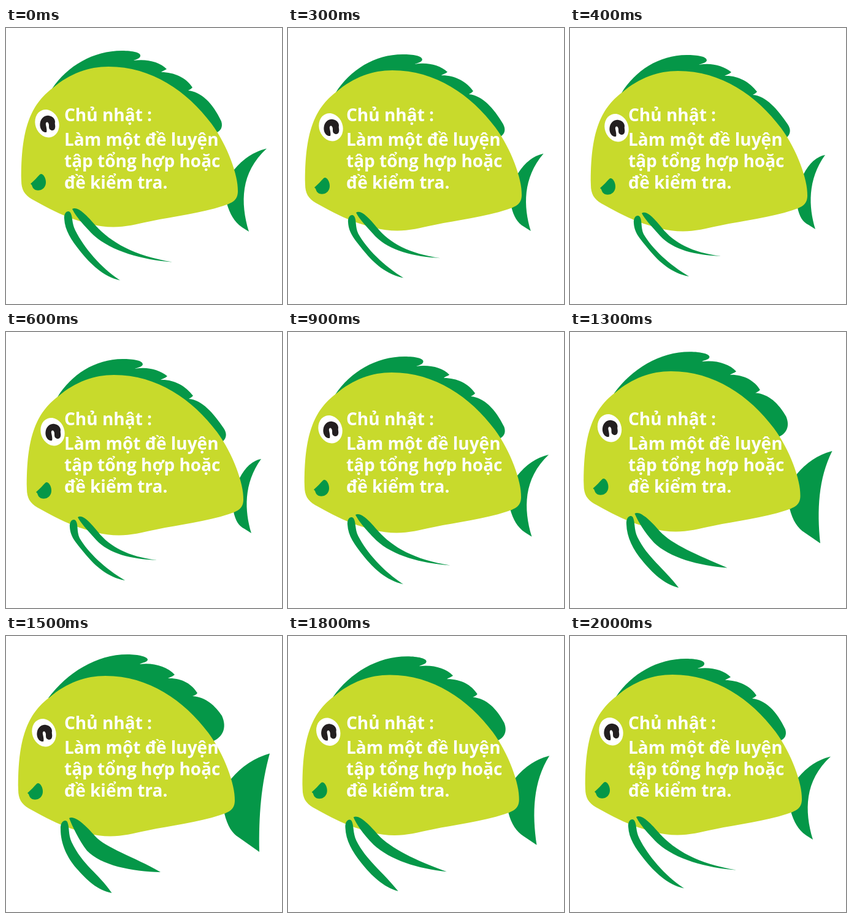
Animation of 450x450 px, one loop 2100 ms. Source, as an HTML page:

```html
<!DOCTYPE html>
<html lang="vi">
<head>
<meta charset="utf-8">
<style>
  html, body { margin: 0; width: 100%; height: 100%; overflow: hidden; background: #fff; }
  svg { display: block; width: 100vw; height: 100vh; }
  .fin { fill: #059748; }
  .skin { fill: #c8da2c; }
  text { font: bold 28px "Open Sans", sans-serif; fill: #fff; }
</style>
</head>
<body>
<svg viewBox="0 0 450 450">
  <g id="fish">
    <path id="tail" class="fin"/>
    <path id="dorsal" class="fin"/>
    <path class="skin" d="M25 249C24 165 40 125 76 98C104 74 135 63 167 63C238 63 295 103 335 156C361 191 379 241 378 266C378 280 370 285 354 290C318 302 274 307 236 315C212 320 195 324.5 175 324.5C150 324.5 124 317 102 308.5C82 301 60 289 42 279C30 272 25 263 25 249Z"/>
    <path id="longFin" class="fin"/>
    <path id="shortFin" class="fin"/>
    <ellipse cx="67" cy="155.7" rx="19.2" ry="23.2" transform="rotate(-20 67 155.7)" fill="#fff"/>
    <path fill="#231f20" d="M63 170C57 168 54 161 56 153C58 146 64 142 70 143C76 144 80 148 80 153C79 156 81 160 80 163C79 168 74 168 71 165C69 162 71 158 69 155C67 152 64 154 65 158C66 163 67 167 66 170Z"/>
    <path class="fin" d="M40 254C46 249 51 243 55 239C57 237 59 238 61 240C65 245 66 252 64 257C61 264 54 266 48 264C44 262 43 259 42 256Z"/>
  </g>
  <text x="95" y="152">Chủ nhật :</text>
  <text x="95" y="192">Làm một đề luyện</text>
  <text x="95" y="227">tập tổng hợp hoặc</text>
  <text x="95" y="262">đề kiểm tra.</text>
</svg>
<script>
// Outlines per part: at rest, folded, just opening, fully spread; ease shapes the folding.
const parts = {
  tail: {
    rest: 'M425 196.5Q394 204 372 231L360 286C365 303 372 316 385 325L396 332C382 285 382 236 425 196.5Z',
    fold: 'M407 200Q386 204 372 231L362 286C365 300 370 309 380 314L391 321C380 285 378 240 407 200Z',
    open: 'M425 196.5Q394 204 372 231L360 286C365 306 374 318 386 326L403 337C393 288 394 236 425 196.5Z',
    spread: 'M435 189.5Q398 200 372 231L361 287C366 308 374 320 384 326L418 350C417 290 421 240 435 189.5Z',
    ease: 1.6
  },
  dorsal: {
    rest: 'M75 99C100 62 142 37 189 37C206 37 221 40 219 46C218 50 212 51 208 53C229 50 251 55 262 67C259 69 255 70 253 72C274 72 294 81 304 97C302 99 299 101 297 102C318 104 337 122 351 152C354 162 350 168 342 171Z',
    fold: 'M75 99C97 63 136 37 181 37C198 37 214 39 214 46C213 50 205 51 201 53C220 49 241 54 254 65C251 68 246 69 243 71C265 70 284 81 296 97C294 99 291 101 289 102C311 104 329 125 346 150C352 159 350 166 345 171Z',
    spread: 'M74 99C105 58 152 28 203 28C221 28 237 32 236 37C235 41 227 41 223 44C245 41 268 48 280 61C277 64 272 65 269 67C291 66 308 76 317 91C315 94 312 95 309 96C332 98 346 112 357 128C366 148 358 163 342 170Z',
    ease: 1.6
  },
  longFin: {
    rest: 'M108 295C116 290 130 303 146 322C172 350 208 371 271 381.5C222 378 172 364 143 338C122 317 113 305 108 295Z',
    fold: 'M108 295C116 290 127 302 141 319C160 343 190 359 237 365C194 363 160 355 138 332C123 315 113 305 108 295Z',
    open: 'M108 295C116 290 131 304 148 324C170 347 208 368 261 384C214 378 170 362 142 337C122 318 113 306 108 295Z',
    spread: 'M108 295C117 290 134 306 150 324C168 344 212 357 257 383C210 382 160 372 137 348C124 331 113 308 108 295Z',
    ease: 1
  },
  shortFin: {
    rest: 'M95 311C94 301 101 296 105 301C109 307 107 318 113 330C127 358 154 390 186 411.5C158 405 137 384 121 364C106 345 96 330 95 311Z',
    fold: 'M95 311C94 301 101 296 105 301C109 307 106 318 111 329C125 353 153 379 185 398C157 393 137 375 121 356C107 338 96 329 95 311Z',
    open: 'M95 312C94 301 101 296 105 301C109 308 107 320 113 333C128 362 154 382 182 415C158 408 137 388 121 367C106 348 96 331 95 312Z',
    spread: 'M94 313C93 301 101 296 105 301C109 311 106 321 112 334C130 372 155 384 177.5 417C154 413 136 395 120 377C105 360 94 337 94 313Z',
    ease: 1
  }
};
const foldShift = [[0, 0], [2, 3], [2.5, 4.5], [3, 6], [9, 7], [10, 8.5]];
const fish = document.getElementById('fish');
const numbers = /-?\d+(\.\d+)?/g;

function blend(a, b, t) {
  const ends = b.match(numbers);
  let i = 0;
  return a.replace(numbers, n => (+n + (ends[i++] - n) * t).toFixed(2));
}

parts.dorsal.open = blend(parts.dorsal.rest, parts.dorsal.spread, .28);

function outline(p, folding, k) {
  if (k === 0) return p.rest;
  return folding ? blend(p.rest, p.fold, (k / 4) ** p.ease) : blend(p.open, p.spread, (k - 1) / 4);
}

function pose(step) {
  const folding = step < 10;
  const k = 5 - Math.abs(step - (folding ? 5 : 15));
  const spread = Math.max(0, k - 1) / 4;
  const [x, y] = folding ? foldShift[k] : [-5 * spread, 2 * spread];
  fish.setAttribute('transform', `translate(${x} ${y})`);
  for (const [id, part] of Object.entries(parts)) {
    document.getElementById(id).setAttribute('d', outline(part, folding, k));
  }
}

const start = performance.now();
let shown = -1;
function tick() {
  const step = Math.floor((performance.now() - start) / 100) % 21;
  if (step !== shown) pose(shown = step);
  requestAnimationFrame(tick);
}
tick();
</script>
</body>
</html>
```
